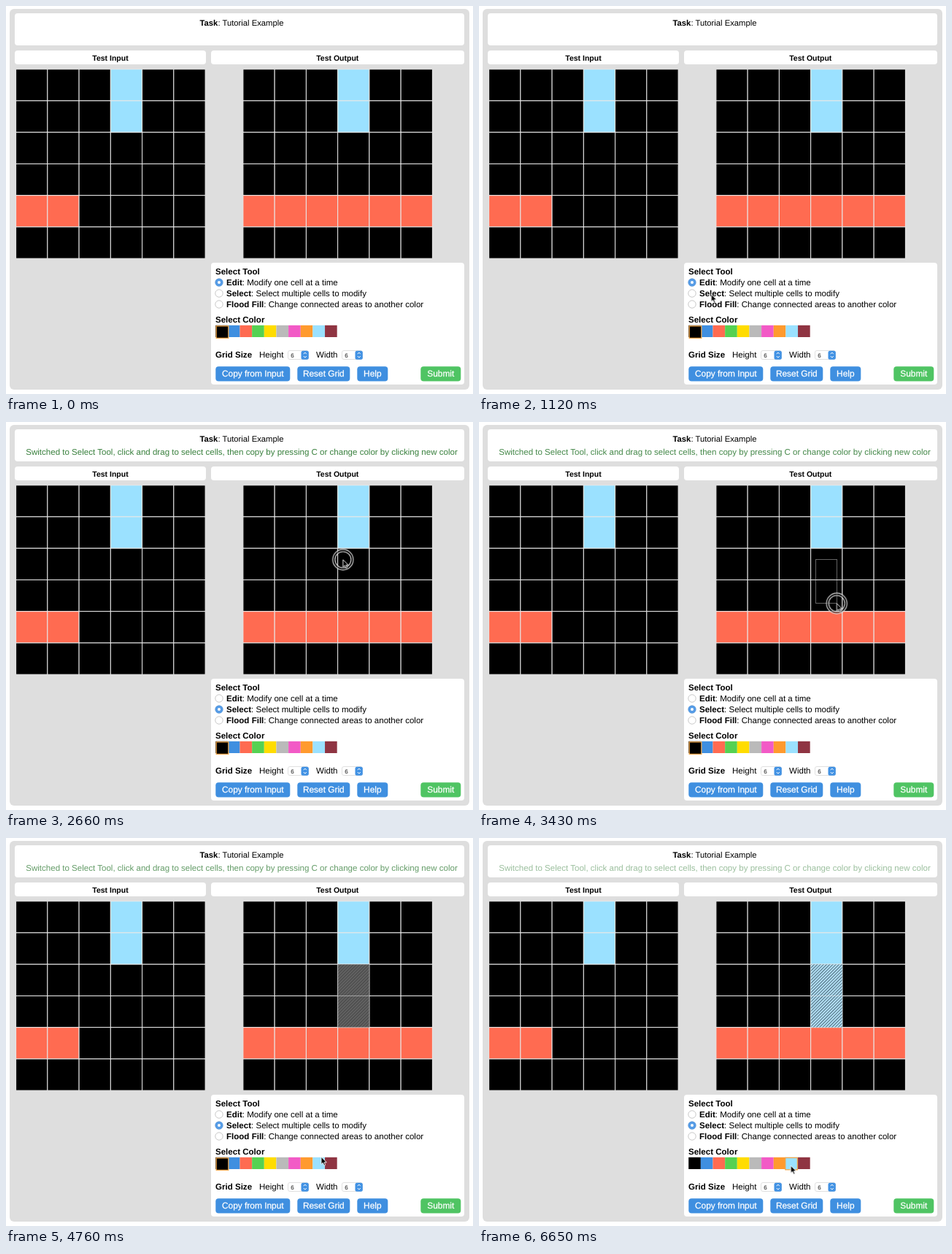
Recreate the animation shown at these times as an HTML page. Size 640 px wide and 532 px high, loop 6.72 s.

```html
<!DOCTYPE html>
<html lang="en">
<head>
<meta charset="utf-8">
<title>Grid editor tutorial</title>
<style>
html, body { margin: 0; width: 100%; height: 100%; overflow: hidden; background: #fff; }
svg { display: block; width: 640px; height: 532px; }
text { font: 11.55px "Liberation Sans", Arial, sans-serif; text-rendering: geometricPrecision; }
.b { font-weight: bold; }
.head { font-size: 10.5px; font-weight: bold; text-anchor: middle; }
.btn { font-size: 11.9px; fill: #fff; stroke: #fff; stroke-width: .25px; text-anchor: middle; }
.num { font-size: 8px; fill: #111; }
.white { fill: #fff; }
.radio { fill: #fff; stroke: #c4c4c4; stroke-width: .9; }
.cell { stroke: #e8e8e8; stroke-width: 1; }
.pick { stroke: #efa64a; stroke-width: 1.3; }
.anim { animation: 6720ms linear infinite; }

#info { fill: #2f7a34; text-anchor: middle; animation-name: info; }
#cursor { animation-name: move; animation-timing-function: ease-in-out; }
#ring { fill: none; animation-name: press; animation-timing-function: step-end; }
#marquee { fill: none; stroke: #c8c8c8; stroke-width: 1; stroke-dasharray: 1 1; animation-name: drag; animation-timing-function: ease-in-out; }
.early, .late, #grayHatch, #blueHatch, #pickFirst, #pickLast { animation-timing-function: step-end; }
.early { animation-name: early; }
.late { animation-name: late; }
#grayHatch, #blueHatch { stroke-opacity: .3; }
#grayHatch { animation-name: selected; }
#pickFirst { animation-name: beforePaint; }
#pickLast, #blueHatch { animation-name: painted; }

@keyframes info {
  0%, 19.79% { opacity: 0; }
  19.8% { opacity: 1; }
  28% { opacity: .99; }
  39.6% { opacity: .957; }
  51% { opacity: .9; }
  70.8% { opacity: .75; }
  83.3% { opacity: .63; }
  100% { opacity: .47; }
}
@keyframes move {
  0%, 3% { transform: translate(646px, 530px); }
  12.5% { transform: translate(330px, 401px); }
  16.7%, 22% { transform: translate(318.3px, 395.3px); }
  36%, 40.5% { transform: translate(461.8px, 188.7px); }
  50.5%, 54% { transform: translate(490.3px, 248.7px); }
  69%, 70.8% { transform: translate(432px, 437.3px); }
  74%, 100% { transform: translate(427.3px, 449.3px); }
}
@keyframes press {
  0% { opacity: 0; }
  18.8% { opacity: 1; }
  21% { opacity: 0; }
  37% { opacity: 1; }
  53% { opacity: 0; }
  74.4% { opacity: 1; }
  77.5% { opacity: 0; }
  100% { opacity: 0; }
}
@keyframes drag {
  0%, 40.49% { width: 0; height: 0; opacity: 0; }
  40.5% { width: 0; height: 0; opacity: 1; }
  50.5%, 53% { width: 29px; height: 60px; opacity: 1; }
  53.01%, 100% { width: 29px; height: 60px; opacity: 0; }
}
@keyframes early { 0% { opacity: 1; } 19.8%, 100% { opacity: 0; } }
@keyframes late { 0% { opacity: 0; } 19.8%, 100% { opacity: 1; } }
@keyframes selected { 0% { opacity: 0; } 53% { opacity: 1; } 75.3%, 100% { opacity: 0; } }
@keyframes beforePaint { 0% { opacity: 1; } 75.3%, 100% { opacity: 0; } }
@keyframes painted { 0% { opacity: 0; } 75.3%, 100% { opacity: 1; } }
</style>
</head>
<body>
<svg viewBox="0 0 640 532">
  <defs>
    <pattern id="gray" width="3" height="3" patternUnits="userSpaceOnUse" patternTransform="rotate(45)">
      <rect width="3" height="3" fill="#626262"/><rect width=".9" height="3" fill="#444"/>
    </pattern>
    <pattern id="blue" width="3" height="3" patternUnits="userSpaceOnUse" patternTransform="rotate(45)">
      <rect width="3" height="3" fill="#b4e0f5"/><rect width=".85" height="3" fill="#3a5868"/>
    </pattern>
    <g id="dot"><circle r="5.5" fill="#569ce6"/><circle r="2" fill="#fff"/></g>
    <g id="stepper">
      <rect x=".5" y=".5" width="28" height="12" rx="2.5" fill="#fff" stroke="#d8d8d8" stroke-width=".8"/>
      <rect x="18.5" y=".7" width="10.3" height="12" rx="2.5" fill="#4292e4"/>
      <path d="M21.8 5.2l2-2.2 2 2.2M21.8 8l2 2.2 2-2.2" fill="none" stroke="#fff"/>
      <text class="num" x="4.2" y="10">6</text>
    </g>
  </defs>

  <rect x="5" y="4" width="630" height="522" rx="6" fill="#dedede"/>
  <g class="white">
    <rect x="12" y="10" width="616" height="44" rx="4"/>
    <rect x="12" y="61" width="262" height="19" rx="4"/>
    <rect x="281" y="61" width="347" height="19" rx="4"/>
    <rect x="281" y="352" width="347" height="167" rx="4"/>
  </g>
  <text x="323" y="27" text-anchor="middle" style="font-size:11.25px"><tspan class="b">Task</tspan>: Tutorial Example</text>
  <text id="info" class="anim" x="323" y="45">Switched to Select Tool, click and drag to select cells, then copy by pressing C or change color by clicking new color</text>
  <text class="head" x="143" y="75">Test Input</text>
  <text class="head" x="454.3" y="75">Test Output</text>

  <g id="grids"></g>
  <g id="grayHatch" class="anim" fill="url(#gray)"></g>
  <g id="blueHatch" class="anim" fill="url(#blue)"></g>

  <text class="b" x="287" y="367.5">Select Tool</text>
  <g class="radio">
    <circle cx="292" cy="379" r="5.2"/><circle cx="292" cy="394" r="5.2"/><circle cx="292" cy="409" r="5.2"/>
  </g>
  <use href="#dot" x="292" y="379" class="anim early"/>
  <use href="#dot" x="292" y="394" class="anim late"/>
  <text x="302" y="383"><tspan class="b">Edit</tspan>: Modify one cell at a time</text>
  <text x="302" y="398"><tspan class="b">Select</tspan>: Select multiple cells to modify</text>
  <text x="302" y="413"><tspan class="b">Flood Fill</tspan>: Change connected areas to another color</text>

  <text class="b" x="287" y="434">Select Color</text>
  <g id="swatches"></g>
  <rect id="pickFirst" class="anim pick" x="288.2" y="438.8" width="16.6" height="16.6" fill="#000"/>
  <rect id="pickLast" class="anim pick" x="419.8" y="438.4" width="16.6" height="16.4" fill="#9be1ff"/>

  <text class="b" x="287" y="481.7">Grid Size</text>
  <text x="347" y="481.7">Height</text>
  <use href="#stepper" x="386" y="472"/>
  <text x="425" y="481.7">Width</text>
  <use href="#stepper" x="460" y="472"/>
  <g id="buttons"></g>

  <rect id="marquee" class="anim" x="461.5" y="188.5"/>
  <g id="cursor" class="anim">
    <g id="ring" class="anim">
      <circle r="12.5" stroke="#000" stroke-opacity=".55" stroke-width="3"/>
      <circle r="14.1" stroke="#e4e4e4" stroke-width="1.1"/>
      <circle r="11" stroke="#e4e4e4" stroke-width="1.1"/>
    </g>
    <path d="M0 0V10.2L2.3 8 4 11.8 5.7 11 4.1 7.4H7.3Z" stroke="#fff" stroke-width=".9"/>
  </g>
</svg>
<script>
const CELL = 43.25, TOP = 86.7, LEFT = 13.6, RIGHT = 324.9;
const BLACK = '#000', RED = '#ff6b51', SKY = '#9be1ff';

function add(id, tag, attrs, text = '') {
  const el = document.createElementNS('http://www.w3.org/2000/svg', tag);
  for (const key in attrs) el.setAttribute(key, attrs[key]);
  el.textContent = text;
  document.getElementById(id).append(el);
}

function addCell(id, left, col, row, style) {
  add(id, 'rect', {
    x: left + col * CELL, y: TOP + row * CELL,
    width: CELL, height: CELL, class: 'cell', ...style
  });
}

function addGrid(left, redCount) {
  for (let row = 0; row < 6; row++) {
    for (let col = 0; col < 6; col++) {
      const sky = col === 3 && row < 2;
      const red = row === 4 && col < redCount;
      addCell('grids', left, col, row, { fill: sky ? SKY : red ? RED : BLACK });
    }
  }
}

addGrid(LEFT, 2);
addGrid(RIGHT, 6);
for (const row of [2, 3]) {
  addCell('grayHatch', RIGHT, 3, row, {});
  addCell('blueHatch', RIGHT, 3, row, {});
}

[BLACK, '#3f8fe0', RED, '#55d152', '#ffdc00', '#bababa', '#f25ac6', '#ff9a2e', SKY, '#8f3442']
  .forEach((fill, i) => add('swatches', 'rect', { x: 287.2 + i * 16.65, y: 437.8, width: 16.65, height: 16.2, fill }));

[['Copy from Input', 287, 102], ['Reset Grid', 399, 72], ['Help', 481, 42], ['Submit', 568, 55]]
  .forEach(([label, x, width]) => {
    const fill = label === 'Submit' ? '#4fc463' : '#3f8fe0';
    add('buttons', 'rect', { x: x + 0.3, y: 494.2, width, height: 20.4, rx: 4, fill });
    add('buttons', 'text', { x: x + 0.3 + width / 2, y: 508.4, class: 'btn' }, label);
  });
</script>
</body>
</html>
```
